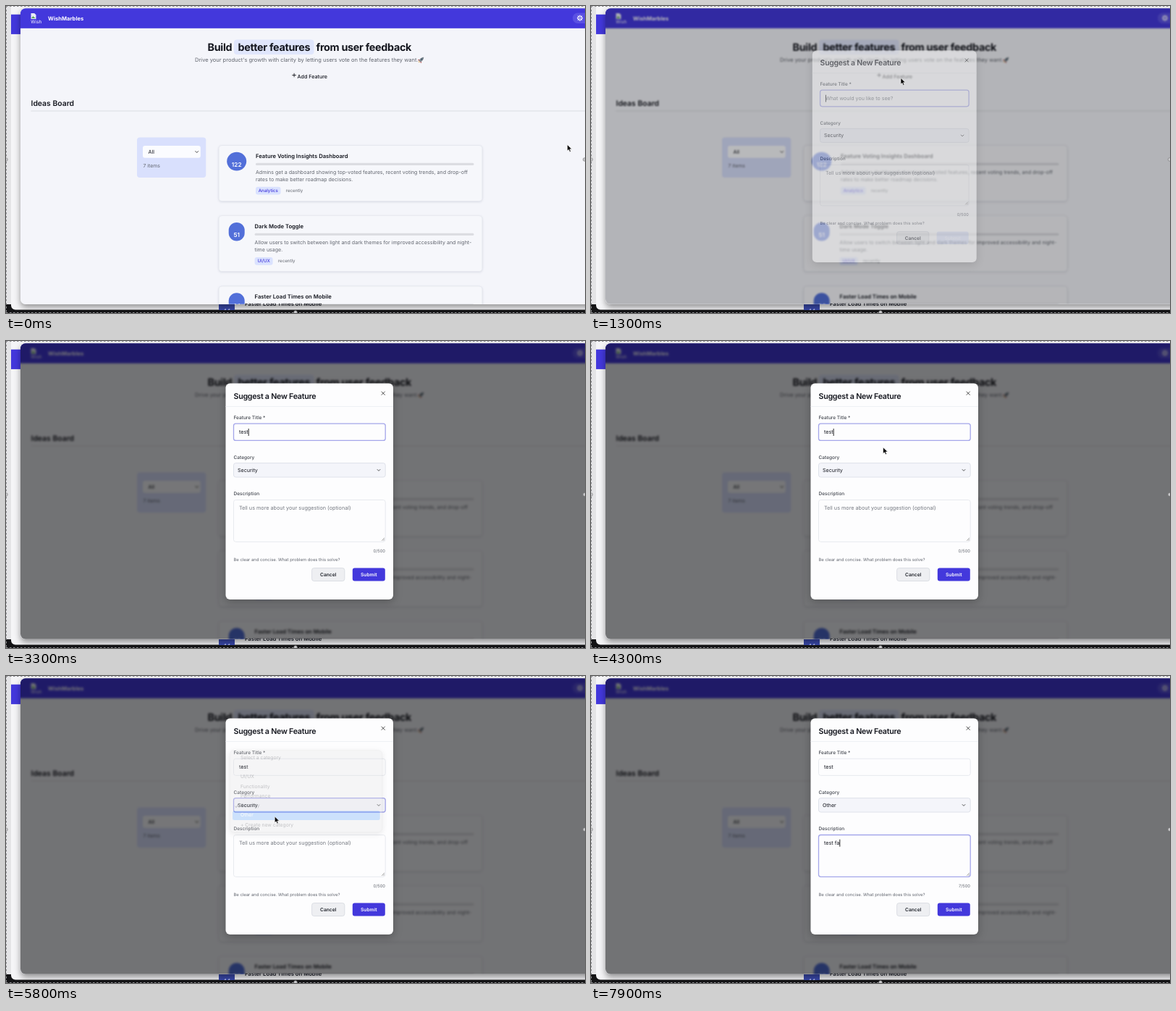
Animation of 800x424 px, one loop 8000 ms. Source, as an HTML page:

```html
<!DOCTYPE html>
<html lang="en">
<head>
<meta charset="utf-8">
<style>
html, body { margin: 0; width: 100%; height: 100%; overflow: hidden; background: #e4e4e6; }
svg { display: block; width: 100vw; height: 100vh; }
text { font-family: Inter, "Liberation Sans", sans-serif; text-rendering: geometricPrecision; white-space: pre; }
#modal { filter: drop-shadow(0 3px 6px rgba(0,0,0,.25)); transform-origin: 419px 208px; }
#menu { filter: drop-shadow(0 2px 4px rgba(0,0,0,.35)); }
.card { filter: drop-shadow(0 1px 1.5px rgba(30,40,80,.12)); }
</style>
</head>
<body>
<svg id="stage" viewBox="0 0 800 424" preserveAspectRatio="none"></svg>
<script>
const INK = '#15171f', GREY = '#62666f', BLUE = '#4338dc', LABEL = '#43474f';

const rect = (x, y, w, h, r, fill, more = '') =>
  `<rect x="${x}" y="${y}" width="${w}" height="${h}" rx="${r}" fill="${fill}" ${more}/>`;
const text = (x, y, size, str, fill = INK, weight = 400, more = '') =>
  `<text x="${x}" y="${y}" font-size="${size}" fill="${fill}" font-weight="${weight}" ${more}>${str}</text>`;
const line = (d, stroke, width = 1, more = '') =>
  `<path d="${d}" fill="none" stroke="${stroke}" stroke-width="${width}" ${more}/>`;
const chevron = (x, y, c) => line(`M${x - 2.2} ${y - 1.1}l2.2 2.2 2.2-2.2`, c, .9);

function card(y, x, badge, votes, title, lines, tag, tagWidth) {
  return rect(294, y, 364, 77, 4, '#f6f7fb', 'stroke="#e4e6ed" stroke-width=".8" class="card"') +
    rect(318.7 - badge / 2, y + 9.3, badge, 25.6, badge / 2, '#526fd9') +
    text(318.7, y + 29.6, 8.2, votes, '#fff', 600, 'text-anchor="middle"') +
    text(x, y + 17, 7.67, title, INK, 600) +
    rect(x, y + 24.2, 646.5 - x, 3.3, 1.6, '#dcdde2') +
    lines.map((s, i) => text(x, y + 39.2 + i * 10.4, 7.07, s, GREY)).join('') +
    rect(x, y + 57.3, tagWidth, 10.8, 3, '#dae2fe') +
    text(x + tagWidth / 2, y + 64.8, 6.15, tag, BLUE, 500, 'text-anchor="middle"') +
    text(x + tagWidth + 7.3, y + 64.8, 6.15, 'recently', GREY);
}

function gear(x, y) {
  let teeth = '';
  for (let a = 0; a < 360; a += 45)
    teeth += rect(x - .7, y - 4.1, 1.4, 2, .4, '#fff', `transform="rotate(${a} ${x} ${y})"`);
  return teeth + `<circle cx="${x}" cy="${y}" r="2.6" fill="none" stroke="#fff" stroke-width=".9"/>
    <circle cx="${x}" cy="${y}" r=".9" fill="#fff"/>`;
}

const rocket = `<g transform="translate(573.7 74.2) rotate(45)">
  <path d="M-1.7 1.2l-1.7 2.4 2-.3zM1.7 1.2l1.7 2.4-2-.3z" fill="#b1443f"/>
  <path d="M0-5C2.4-2.8 2.2 1 1.4 3h-2.8C-2.2 1-2.4-2.8 0-5z" fill="#7d8790"/>
  <circle cy="-1" r=".9" fill="#2f4a5c"/><path d="M-1 3.2h2l-1 2z" fill="#e39a3c"/></g>`;

const desktop =
  rect(0, 0, 800, 424, 0, '#e4e4e6') +
  rect(0, 412, 800, 12, 0, '#141416') +
  rect(7, -10, 810, 429.5, 6, '#f5f5f7') +
  rect(7, 11.7, 793, 27.2, 0, BLUE) +
  rect(294, 408, 22, 12, 0, '#3a49ab') +
  text(305, 423.5, 8, '44', '#b4bdea', 600, 'text-anchor="middle"') +
  rect(0, 420, 800, 4, 0, '#141416') +
  rect(20, 3, 800, 409, 7, '#f4f5fa', 'style="filter:drop-shadow(0 4px 4px rgba(0,0,0,.4))"');

const page =
  rect(0, -10, 830, 440, 0, '#f4f5fa') +
  rect(0, -10, 830, 40.8, 0, BLUE) +
  '<path d="M34.5 10h4.6l2.4 2.3v5.6h-7z" fill="#e8ecf6"/><path d="M35 17l2.3-3 3.4 3z" fill="#58a55c"/>' +
  text(34.3, 24, 6.4, 'Wish', '#fff') +
  text(58, 19.7, 7.6, 'WishMarbles', '#fff', 700) +
  rect(783, 9.5, 24, 14.5, 7, '#5a51e3') + gear(793, 16.6) +
  rect(315, 46.5, 110.5, 20.6, 4, '#e0e6fc') +
  [[278.5, 'Build'], [320.5, 'better features'], [428.5, 'from user feedback']]
    .map(([x, s]) => text(x, 62, 14.35, s, INK, 700, 'letter-spacing="-.3"')).join('') +
  text(261, 77, 7.5, "Drive your product's growth with clarity by letting users vote on the features they want.", GREY) +
  rocket +
  line('M395.4 95.5h5.4M398.1 92.8v5.4', INK, .9) +
  text(402.5, 99.5, 7.15, 'Add Feature', INK, 500) +
  text(34.5, 137.7, 10.4, 'Ideas Board', INK, 600) +
  rect(34.5, 144.5, 780, 1, 0, '#dcdee4') +
  rect(181, 181.5, 95.3, 55.5, 4, '#d9e0fd') +
  rect(189, 193, 79.8, 16.8, 3, '#fbfcff') +
  text(196.5, 204, 7.2, 'All') + chevron(263.7, 201.4, '#333') +
  text(189.5, 222.8, 6.9, '7 items', GREY) +
  card(192.5, 345, 27, '122', 'Feature Voting Insights Dashboard',
    ['Admins get a dashboard showing top-voted features, recent voting trends, and drop-off',
     'rates to make better roadmap decisions.'], 'Analytics', 34.5) +
  card(289.6, 343.6, 22, '51', 'Dark Mode Toggle',
    ['Allow users to switch between light and dark themes for improved accessibility and night-',
     'time usage.'], 'UI/UX', 25) +
  card(387, 343.6, 22, '44', 'Faster Load Times on Mobile', [], '', 0);

const field = (id, y, h, fill) =>
  rect(314.5, y, 209.7, h, 3, fill, `id="${id}"`);

const modal =
  rect(303.5, 58.5, 231.5, 298.5, 6, '#fdfdfe') +
  text(314.5, 79.9, 10.7, 'Suggest a New Feature', INK, 600, 'letter-spacing="-.27"') +
  line('M518.7 69.7l5 5m0-5l-5 5', '#444', .9) +
  rect(303.5, 90, 231.5, .8, 0, '#eceef2') +
  [['Feature Title *', 108.2], ['Category', 162.8], ['Description', 213.4]]
    .map(([s, y]) => text(314.5, y, 6.53, s, LABEL, 500)).join('') +
  field('title', 114.2, 23.2, '#fdfdfe') + text(322, 128.4, 7.24, '', INK, 400, 'id="titleText"') +
  field('category', 168.6, 19.4, '#f4f5fa') + text(320, 180.6, 7.1, '', INK, 400, 'id="categoryText"') +
  chevron(515, 178.3, '#444') +
  field('about', 219.5, 57.8, '#fdfdfe') + text(322, 233.1, 7.24, '', INK, 400, 'id="aboutText"') +
  line('M519.2 275.7l3.8-3.8M521.4 275.7l1.6-1.6', '#777', .7) +
  rect(0, 0, .9, 10, 0, '#111', 'id="caret"') +
  text(524, 291.6, 5.8, '', GREY, 400, 'id="count" text-anchor="end"') +
  text(314.5, 303.7, 5.9, 'Be clear and concise. What problem does this solve?', GREY) +
  rect(422.6, 313.6, 45.2, 17.9, 3, '#eeeff2', 'stroke="#d5d8df" stroke-width=".8"') +
  text(445.2, 324.9, 6.65, 'Cancel', '#22252d', 600, 'text-anchor="middle"') +
  rect(478.8, 313.6, 45, 17.8, 3, BLUE, 'id="submit"') +
  text(501.3, 324.9, 6.65, 'Submit', '#fff', 600, 'id="submitText" text-anchor="middle"');

const options = ['Select a category', 'All', 'UI/UX', 'Functionality', 'Performance', 'Security',
  'Other', '+ Create new category'];
const ROW = 13.27;
const menu =
  rect(309.5, 102.7, 210, 112.8, 5, '#e1e1e2', 'stroke="#bbb" stroke-width=".5"') +
  rect(313, 0, 203.7, 12.8, 2.5, '#3d91f8', 'id="hover"') +
  options.map((s, i) => text(324, 114.7 + i * ROW, 6.75, s, INK, 400, 'class="option"')).join('') +
  line('M316.4 179.6l1.7 2 2.8-4.4', INK, 1, 'id="check"');

const handle = (x, y) => `<circle cx="${x}" cy="${y}" r="2.3" fill="#c9c9cc" stroke="#777" stroke-width=".6"/>`;
const dashes = line('M0 .5H800M.5 0V424M0 423.5H800', '#8b8b8e', 1, 'stroke-dasharray="2.5 2.5"') +
  handle(0, 212) + handle(799.5, 212) + handle(400, 423);

document.getElementById('stage').innerHTML =
  `<defs><clipPath id="win">${rect(20, 3.3, 800, 408.5, 7, '#000')}</clipPath>
   <clipPath id="low">${rect(320, 410.8, 130, 4.2, 0, '#000')}</clipPath></defs>
   ${desktop}
   <g clip-path="url(#win)"><g id="page">${page}</g>${rect(20, 3, 800, 410, 0, '#000', 'id="shade"')}</g>
   <g clip-path="url(#low)">${text(330, 414.2, 7.67, 'Faster Load Times on Mobile', INK, 600)}</g>
   ${dashes}
   <g id="modal">${modal}</g><g id="menu">${menu}</g>
   <path id="cursor" d="M0 0v8.6l2-1.8 1.4 3.1 1.5-.7-1.4-3h2.8z" fill="#000" stroke="#fff" stroke-width=".6"/>`;

const $ = id => document.getElementById(id);
const set = (id, attrs) => { for (const k in attrs) $(id).setAttribute(k, attrs[k]); };
const show = (id, on) => { $(id).style.display = on ? '' : 'none'; };

// time, x, y of the pointer tip
const path = [[0, 775.5, 191.5], [1000, 428, 99.5], [3700, 428, 99.5], [4150, 405, 145], [4250, 405, 145],
  [4600, 379.5, 179], [4800, 379.5, 179], [5100, 370, 192.5], [5300, 371.3, 194], [5800, 371.3, 194],
  [6500, 363, 245], [8000, 363, 245]];

function pointer(t) {
  const i = path.findIndex(p => p[0] > t);
  const [t0, x0, y0] = path[i - 1], [t1, x1, y1] = path[i];
  const u = (t - t0) / (t1 - t0), e = u * u * (3 - 2 * u);
  return [x0 + (x1 - x0) * e, y0 + (y1 - y0) * e];
}

const typed = (str, times, t) => str.slice(0, times.filter(k => k <= t).length);

function fill(id, value, hint) {
  $(id).textContent = value || hint;
  set(id, { fill: value ? INK : '#73777f' });
}

function draw(t) {
  const open = t < 1300 ? 0 : t < 1400 ? .5 : 1;
  $('page').style.filter = open ? `blur(${1.7 * open}px)` : 'none';
  set('shade', { opacity: .53 * open });
  show('modal', open);
  $('modal').style.opacity = open;
  $('modal').style.transform = `scale(${.96 + .04 * open})`;

  const title = typed('test', [2800, 2900, 3100, 3300], t);
  const about = typed('test fa', [6800, 6900, 7000, 7100, 7500, 7600, 7900], t);
  fill('titleText', title, 'What would you like to see?');
  fill('aboutText', about, 'Tell us more about your suggestion (optional)');
  $('categoryText').textContent = t < 5900 ? 'Security' : 'Other';
  $('count').textContent = about.length + '/500';
  set('submit', { fill: title ? BLUE : '#dfe5fc' });
  set('submitText', { fill: title ? '#fff' : '#f1f4ff' });

  const focus = t < 4600 ? 'title' : t < 6700 ? 'category' : 'about';
  for (const id of ['title', 'category', 'about'])
    set(id, id === focus ? { stroke: '#a4a6ea', 'stroke-width': 1.3 }
      : { stroke: id === 'category' ? '#dcdfe8' : '#e6e8ee', 'stroke-width': .9 });

  const blinkOff = (t >= 1800 && t < 2300) || (t >= 3800 && t < 4300);
  show('caret', focus !== 'category' && !blinkOff);
  const inTitle = focus === 'title', value = inTitle ? title : about;
  const width = value ? $(inTitle ? 'titleText' : 'aboutText').getComputedTextLength() : 0;
  set('caret', { x: 322 + width, y: inTitle ? 121 : 225.7 });

  const [x, y] = pointer(t);
  set('cursor', { transform: `translate(${x} ${y})` });
  show('cursor', t < 2800 || (t >= 3800 && t < 6800));

  show('menu', t >= 4600 && t < 5900);
  $('menu').style.opacity = t < 5800 ? 1 : .25;
  const row = t >= 5700 && t < 5800 ? -1 : Math.floor((y - 105.5) / ROW);
  show('hover', row >= 0);
  set('hover', { y: 106 + row * ROW + .6 });
  document.querySelectorAll('.option').forEach((el, i) => el.setAttribute('fill', i === row ? '#fff' : INK));
  set('check', { stroke: row === 5 ? '#fff' : INK });
}

function frame() {
  draw(Math.floor(performance.now() % 8000 / 100) * 100);
  requestAnimationFrame(frame);
}
frame();
</script>
</body>
</html>
```
